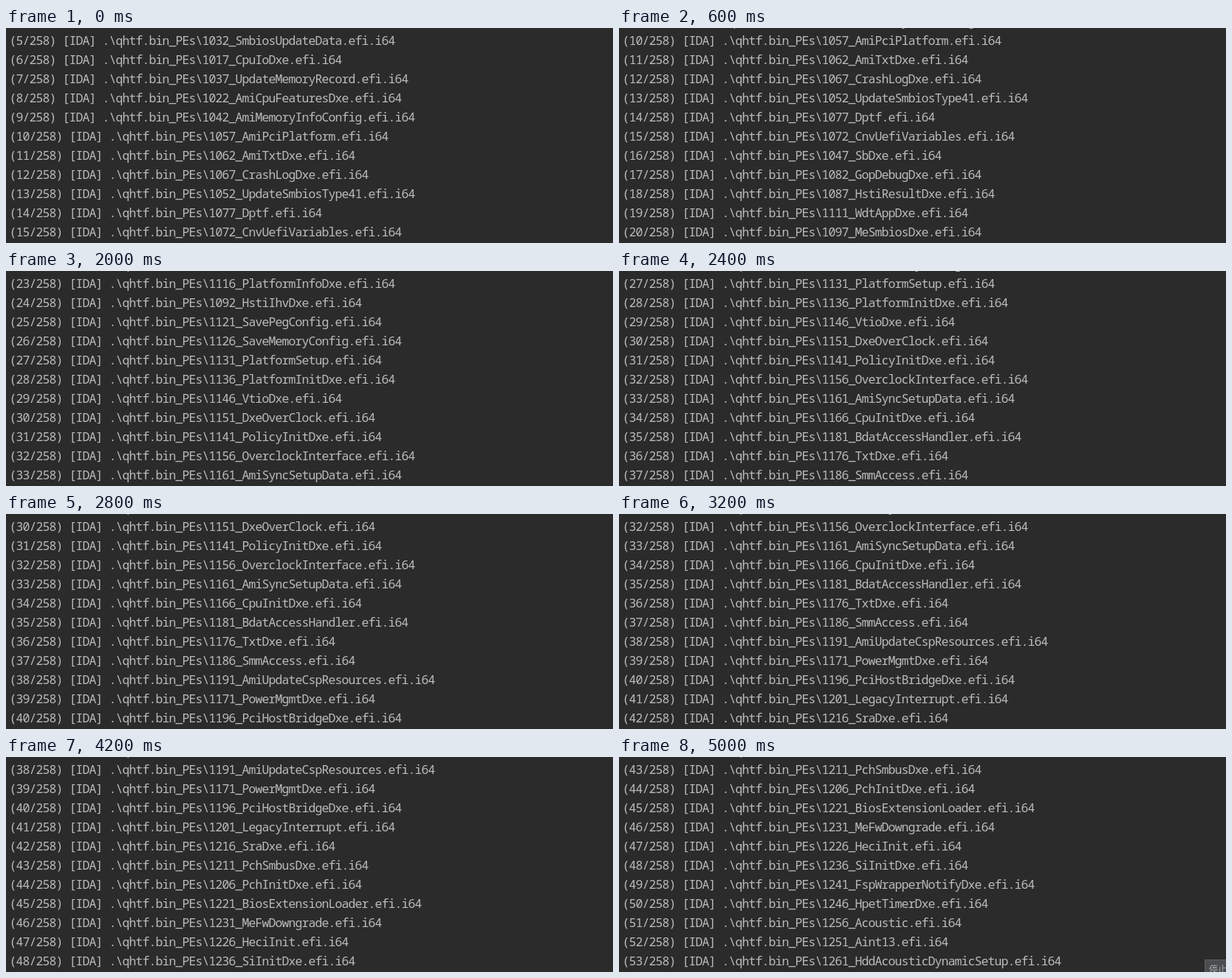
An HTML page for the animation above (5200 ms loop, 822 px wide and 292 px high).

```html
<!DOCTYPE html>
<html lang="en">
<head>
<meta charset="utf-8">
<title>Terminal log</title>
<style>
  html, body { margin: 0; width: 100%; height: 100%; overflow: hidden; background: #2b2b2b; }
  svg { display: block; width: 100vw; height: 100vh; }
  #log {
    font: 500 16.5px "Noto Sans Mono", "Liberation Mono", monospace;
    letter-spacing: calc(9px - 0.6em);
    font-variant-ligatures: none;
    fill: #bbb;
  }
  #tip { opacity: 0; font: 12px "Noto Sans CJK SC", "Noto Sans CJK JP", sans-serif; }
</style>
</head>
<body>
<svg viewBox="0 0 822 292">
  <g id="log"></g>
  <g id="tip">
    <rect x="793.5" y="275.5" width="40" height="30" fill="#4b4d4f" stroke="#5e6062"/>
    <text x="799" y="293" fill="#a9abad">停止</text>
  </g>
</svg>
<script>
const FIRST = 5, TOTAL = 258, ROW = 26, LOOP = 5200, TICK = 200;

const modules = `
1032_SmbiosUpdateData 1017_CpuIoDxe 1037_UpdateMemoryRecord 1022_AmiCpuFeaturesDxe
1042_AmiMemoryInfoConfig 1057_AmiPciPlatform 1062_AmiTxtDxe 1067_CrashLogDxe
1052_UpdateSmbiosType41 1077_Dptf 1072_CnvUefiVariables 1047_SbDxe 1082_GopDebugDxe
1087_HstiResultDxe 1111_WdtAppDxe 1097_MeSmbiosDxe 1106_SmbiosMisc 1101_SataController
1116_PlatformInfoDxe 1092_HstiIhvDxe 1121_SavePegConfig 1126_SaveMemoryConfig
1131_PlatformSetup 1136_PlatformInitDxe 1146_VtioDxe 1151_DxeOverClock 1141_PolicyInitDxe
1156_OverclockInterface 1161_AmiSyncSetupData 1166_CpuInitDxe 1181_BdatAccessHandler
1176_TxtDxe 1186_SmmAccess 1191_AmiUpdateCspResources 1171_PowerMgmtDxe
1196_PciHostBridgeDxe 1201_LegacyInterrupt 1216_SraDxe 1211_PchSmbusDxe 1206_PchInitDxe
1221_BiosExtensionLoader 1231_MeFwDowngrade 1226_HeciInit 1236_SiInitDxe
1241_FspWrapperNotifyDxe 1246_HpetTimerDxe 1256_Acoustic 1251_Aint13
1261_HddAcousticDynamicSetup`.trim().split(/\s+/);

// Number of the top visible line at each tick
const topLines = [
  5, 7, 8, 10, 12, 13, 15, 17, 19, 21, 23, 25, 27,
  28, 30, 31, 32, 33, 34, 35, 37, 38, 39, 40, 42, 43
];

const log = document.getElementById("log");
const tip = document.getElementById("tip");

modules.forEach((name, i) => {
  const line = document.createElementNS("http://www.w3.org/2000/svg", "text");
  line.setAttribute("x", 4.5);
  line.setAttribute("y", 23 + i * ROW);
  line.textContent = `(${FIRST + i}/${TOTAL}) [IDA] .\\qhtf.bin_PEs\\${name}.efi.i64`;
  log.append(line);
});

// Plays [time, style] pairs as hard cuts
function playSteps(element, steps) {
  const frames = steps.map(([time, style]) => ({ ...style, offset: time / LOOP, easing: "steps(1, end)" }));
  frames.push({ ...steps.at(-1)[1], offset: 1 });
  element.animate(frames, { duration: LOOP, iterations: Infinity });
}

playSteps(log, topLines.map((top, i) =>
  [i * TICK, { transform: `translateY(${(FIRST - top) * ROW}px)` }]));
playSteps(tip, [[0, { opacity: 0 }], [5000, { opacity: 1 }]]);
</script>
</body>
</html>
```
